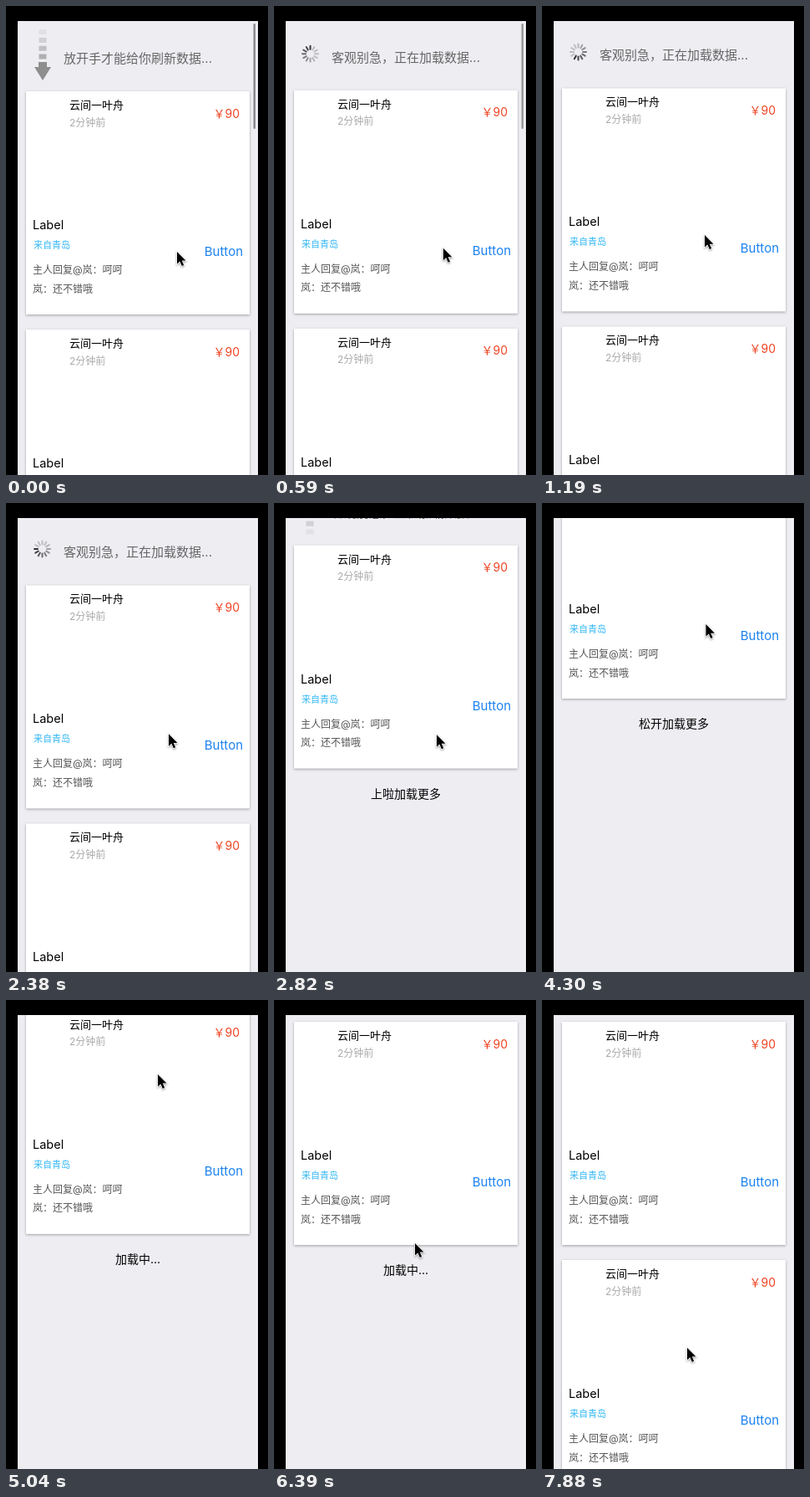
Animation, 314 px wide and 561 px high, one loop 8000 ms. Source, as an HTML page:

```html
<!DOCTYPE html>
<html lang="zh-CN">
<head>
<meta charset="utf-8">
<style>
html, body { margin: 0; width: 100%; height: 100%; overflow: hidden; background: #000; }
svg { display: block; font-family: Inter, "Noto Sans CJK SC", "Noto Sans CJK", sans-serif; }
.paper { fill: #fff; filter: drop-shadow(.5px 1px 1.5px #0005); }
.reply { font-size: 12px; fill: #555; }
#pointer { filter: drop-shadow(0 1px 1px #0006); }
</style>
</head>
<body>
<svg width="314" height="561" viewBox="0 0 314 561">
  <clipPath id="screen"><rect x="14" y="18" width="288" height="543"/></clipPath>
  <rect width="314" height="561"/>
  <g clip-path="url(#screen)">
    <rect x="14" y="18" width="288" height="543" fill="#eeedf2"/>
    <g id="list">
      <g id="arrow" fill="#8e8e8e"><path d="M39-35h10v6h5L44-13 34-29h5z"/></g>
      <g id="spinner" stroke="#333" stroke-width="2" stroke-linecap="round"></g>
      <text id="header" x="69" y="-34" font-size="15" fill="#666"></text>
      <g id="card">
        <rect class="paper" x="24" width="268" height="267"/>
        <text x="76" y="21" font-size="13">云间一叶舟</text>
        <text x="76" y="41.500" font-size="12" fill="#aaa">2分钟前</text>
        <text x="280" y="31.500" font-size="14" fill="#ee4423" text-anchor="end">￥90</text>
        <text x="32" y="165" font-size="14.500">Label</text>
        <text x="33" y="188" font-size="11" fill="#35b8f5">来自青岛</text>
        <text x="284" y="197" font-size="15" fill="#1a82f0" text-anchor="end">Button</text>
        <text class="reply" x="32" y="218">主人回复@岚：呵呵</text>
        <text class="reply" x="32" y="240.500">岚：还不错哦</text>
      </g>
      <use id="second" href="#card" y="285"/>
      <text id="footer" x="158" y="302" font-size="14" text-anchor="middle"></text>
    </g>
    <rect id="bar" x="296.500" y="21" width="2.500" height="126" rx="1.250" fill="#8a8a8d"/>
  </g>
  <path id="pointer" d="M0 0V14.500L3.400 11.400 5.800 17 8.200 16 5.800 10.600H10.500Z" stroke="#fff" stroke-width="1.500" paint-order="stroke"/>
</svg>
<script>
const LOOP = 8000, TICK = 148.5;
const RELEASE = 440, REFRESHED = 2578, DRAG = 3262, LOAD = 4771, LOADED = 7120;

// key points of the pointer: time, x, y
const path = [[RELEASE, 205, 294], [1150, 195, 274], [DRAG, 195, 278], [3712, 208, 190],
  [5049, 182, 89], [5643, 222, 214], [5940, 168, 284], [6385, 169, 291],
  [7425, 169, 291], [7870, 174, 416]];

const clamp = p => Math.max(0, Math.min(1, p));
const smooth = p => p * p * (3 - 2 * p);
const rubber = p => 1 - (1 - p) ** 2;
const move = (t, start, span, by, ease = smooth) => by * ease(clamp((t - start) / span));

const listTop = t => 102 + move(t, RELEASE, 400, -3.6) + move(t, REFRESHED, 400, -72.4)
  + move(t, DRAG, 1040, -59, rubber) + move(t, LOAD, 400, 59);

function pointerAt(t) {
  let [, x, y] = path[0];
  for (let i = 1; i < path.length; i++) {
    const [t0, x0, y0] = path[i - 1], [t1, x1, y1] = path[i];
    const p = clamp((t - t0) / (t1 - t0));
    x += (x1 - x0) * p;
    y += (y1 - y0) * p;
  }
  return [x, y];
}

const el = id => document.getElementById(id);
const set = (id, name, value) => el(id).setAttribute(name, value);
const show = (id, on) => set(id, "visibility", on ? "visible" : "hidden");

for (let i = 0; i < 4; i++) {
  el("arrow").innerHTML +=
    `<rect x="39.500" y="${-44.5 - 9.8 * i}" width="9" height="6" opacity="${.65 - .17 * i}"/>`;
}
// The leading spoke is darkest; the rest trail behind it.
for (let i = 0; i < 12; i++) {
  el("spinner").innerHTML +=
    `<path d="M0-5.500V-9.500" transform="rotate(${-30 * i})" opacity="${Math.max(.25, 1 - i * .1)}"/>`;
}

function draw(t) {
  const top = listTop(t);
  const pulling = t < RELEASE;
  const refreshing = !pulling && t < REFRESHED + 200;
  const single = t >= REFRESHED && t < LOADED;
  const turn = 150 + 30 * Math.floor(t * .012);

  set("list", "transform", `translate(0 ${top})`);
  set("pointer", "transform", `translate(${pointerAt(t)})`);
  set("spinner", "transform", `translate(43.5 -43.5) rotate(${turn})`);
  set("arrow", "transform", pulling ? "" : "rotate(180 43.5 -43.5)");
  set("bar", "opacity", 1 - move(t, 500, 400, 1));
  show("spinner", refreshing);
  show("arrow", !refreshing);
  show("second", !single);
  show("footer", single);
  el("header").textContent = pulling ? "放开手才能给你刷新数据..." : "客观别急，正在加载数据...";
  el("footer").textContent = t >= LOAD ? "加载中..." : top < 0 ? "松开加载更多" : "上啦加载更多";
}

// The picture advances in even ticks, like a screen recording.
const start = performance.now();
function frame() {
  const t = (performance.now() - start) % LOOP;
  draw(Math.floor((t + 10) / TICK) * TICK);
  requestAnimationFrame(frame);
}
frame();
</script>
</body>
</html>
```
